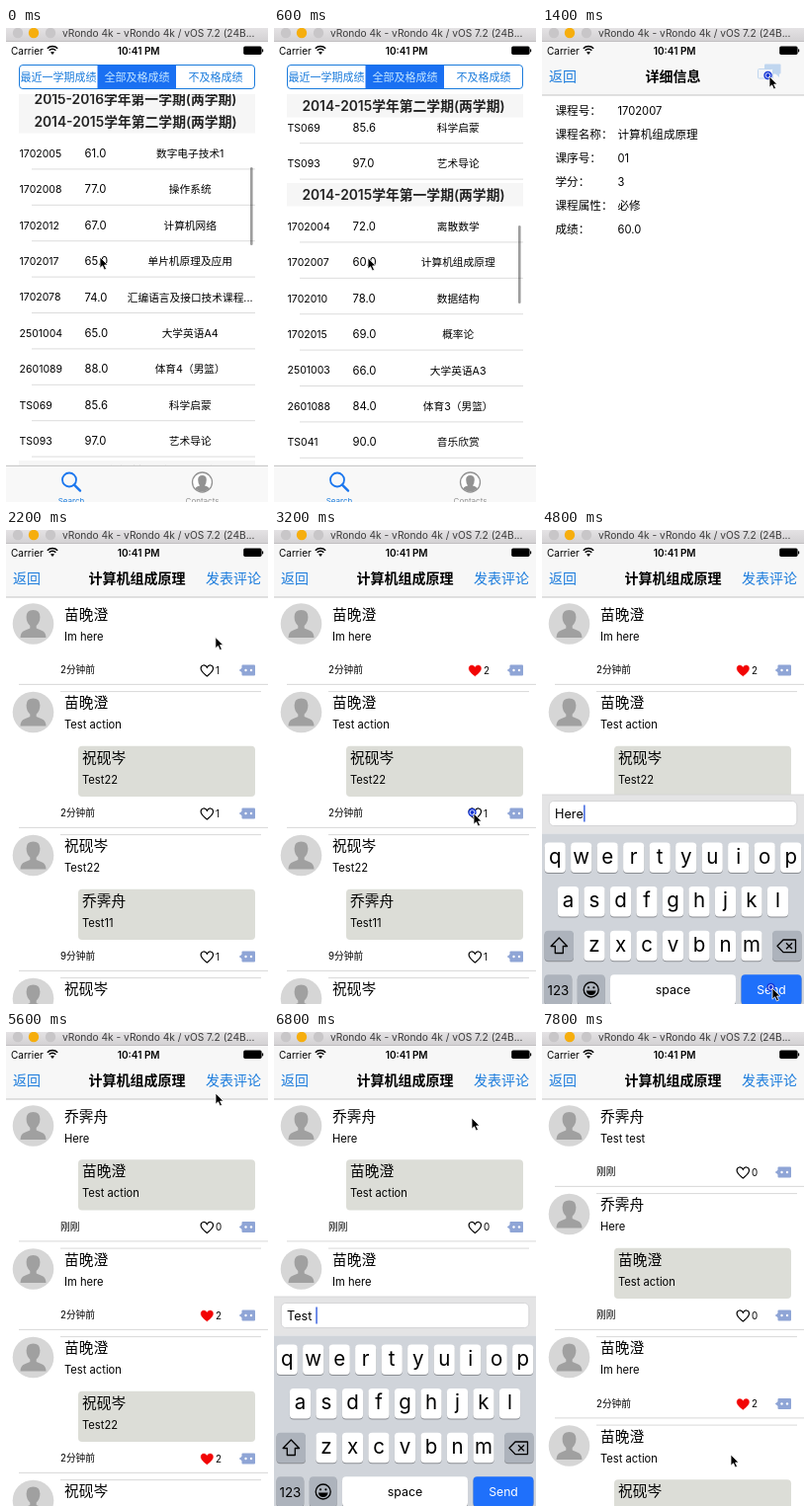
An HTML page for the animation above (8000 ms loop, 265 by 480 pixels).

```html
<!DOCTYPE html>
<html lang="zh-CN">
<head>
<meta charset="utf-8">
<title>Course comments</title>
<style>
  html, body { margin: 0; width: 100%; height: 100%; overflow: hidden; background: #fff; }
  svg { display: block; width: 100%; height: 100%; }
  text { font-family: Inter, "Noto Sans CJK SC", "Noto Sans CJK", sans-serif; }
</style>
</head>
<body>
<svg id="stage" viewBox="0 0 265 480"></svg>
<script>
const LOOP = 8000, STEP = 200, W = 265;
const BLUE = '#1a7bdc', LINE = '#cfcfcf';
const stage = document.getElementById('stage');
const pen = document.createElement('canvas').getContext('2d');

// Easing
const clamp = v => Math.max(0, Math.min(1, v));
const part = (t, a, b) => clamp((t - a) / (b - a));
const easeOut = k => 1 - (1 - k) ** 2;
const smooth = k => k * k * (3 - 2 * k);
const mix = (a, b, k) => a + (b - a) * k;

// Drawing helpers
const rect = (x, y, w, h, fill, r = 0, more = '') =>
  `<rect x="${x}" y="${y}" width="${w}" height="${h}" rx="${r}" fill="${fill}" ${more}/>`;
const circle = (x, y, r, fill, more = '') =>
  `<circle cx="${x}" cy="${y}" r="${r}" fill="${fill}" ${more}/>`;
const path = (d, fill, stroke = 'none', width = 1, more = '') =>
  `<path d="${d}" fill="${fill}" stroke="${stroke}" stroke-width="${width}" ${more}/>`;
const hline = (x1, x2, y, color = LINE) => path(`M${x1} ${y}H${x2}`, 'none', color, .8);
const text = (s, x, y, size, fill = '#000', more = '') =>
  `<text x="${x}" y="${y}" font-size="${size}" fill="${fill}" ${more}>${s}</text>`;
const mid = (s, x, y, size, fill, more = '') => text(s, x, y, size, fill, `text-anchor="middle" ${more}`);
const bold = 'font-weight="600"';
const move = (x, y, body, more = '') => `<g transform="translate(${x} ${y})" ${more}>${body}</g>`;

// Window title and status bar
const defs = `<defs>
  <linearGradient id="bar" x2="0" y2="1"><stop stop-color="#e4e2e4"/><stop offset="1" stop-color="#d3d1d3"/></linearGradient>
  <clipPath id="list"><rect x="0" y="67" width="265" height="376"/></clipPath>
</defs>`;

function chrome() {
  const arc = r => path(`M${47 - r * .72} ${26 - r * .72}A${r} ${r} 0 0 1 ${47 + r * .72} ${26 - r * .72}`, 'none', '#000', 1.5);
  return rect(0, 0, W, 13.5, 'url(#bar)') + hline(0, W, 13.5, '#b9b7b9') +
    circle(12, 5, 5.2, '#c8c6c8') + circle(28, 5, 5.2, '#f6ae0e') + circle(45, 5, 5.2, '#c8c6c8') +
    text('vRondo 4k - vRondo 4k / vOS 7.2 (24B...', 57, 9.3, 10.2, '#3a3a3a') +
    text('Carrier', 5, 26.8, 10) +
    arc(7.2) + arc(4.6) + path('M47 27L45 24.6Q47 23.2 49 24.6Z', '#000') +
    mid('10:41 PM', 134.2, 26.8, 10, '#000', bold) +
    rect(240.2, 18.5, 18.4, 8.4, '#000', 1.6) + rect(259, 21.2, 1.2, 3.2, '#000', .6);
}

// Grade list
const ROW = 36.4, HEAD = 23.5;
const terms = [
  { title: '2015-2016学年第一学期(两学期)', y: -400, rows: [] },
  { title: '2014-2015学年第二学期(两学期)', y: 83, rows: [
    ['1702005', '61.0', '数字电子技术1'], ['1702008', '77.0', '操作系统'],
    ['1702012', '67.0', '计算机网络'], ['1702017', '65.0', '单片机原理及应用'],
    ['1702078', '74.0', '汇编语言及接口技术课程...'], ['2501004', '65.0', '大学英语A4'],
    ['2601089', '88.0', '体育4（男篮）'], ['TS069', '85.6', '科学启蒙'], ['TS093', '97.0', '艺术导论']] },
  { title: '2014-2015学年第一学期(两学期)', y: 438, rows: [
    ['1702004', '72.0', '离散数学'], ['1702007', '60.0', '计算机组成原理'],
    ['1702010', '78.0', '数据结构'], ['1702015', '69.0', '概率论'],
    ['2501003', '66.0', '大学英语A3'], ['2601088', '84.0', '体育3（男篮）'],
    ['TS041', '90.0', '音乐欣赏'], ['TS052', '86.0', '文学导论']] }
];

function segments() {
  const names = ['最近一学期成绩', '全部及格成绩', '不及格成绩'];
  return rect(13.5, 37.5, 238, 24, '#fff', 3.5, `stroke="${BLUE}" stroke-width="1"`) +
    rect(92.5, 37.5, 79.5, 24, '#1a70f2') +
    names.map((s, i) => mid(s, 53 + i * 79.5, 54, 11, i === 1 ? '#c4e6ff' : BLUE)).join('');
}

function tabs() {
  return rect(0, 443, W, 37, '#f8f8f8') + hline(0, W, 443.4, '#b5b5b5') +
    circle(64, 457.5, 7, 'none', 'stroke="#1a76ee" stroke-width="1.8"') +
    path('M69 462.6L75 468.6', 'none', '#1a76ee', 2.4, 'stroke-linecap="round"') +
    circle(198.5, 460, 10, '#fff', 'stroke="#929292" stroke-width="1.3"') +
    path('M191.5 466.5Q192 464.5 196 463.5Q194.2 461 194.2 457.5Q194.2 453 198.5 453T202.8 457.5Q202.8 461 201 463.5Q205 464.5 205.5 466.5Q202.5 469.3 198.5 469.3T191.5 466.5Z', '#929292') +
    mid('Search', 66, 482, 8, BLUE) + mid('Contacts', 198.5, 482, 8, '#929292');
}

function grades(t) {
  const s = 281 * smooth(part(t, 0, 600));
  let out = '';
  for (const term of terms) term.rows.forEach(([id, score, name], i) => {
    const y = term.y + HEAD + i * ROW - s;
    if (y < 20 || y > 443) return;
    if (id === '1702007' && t >= 800) out += rect(13, y, 239, ROW, '#d9d9d9');
    out += text(id, 13.6, y + 24.3, 10.5) + text(score, 79.6, y + 24.5, 11.3) +
      mid(name, 186.2, y + 24.5, 10.7) + hline(26, 252, y + ROW, '#d4d4d4');
  });
  terms.forEach((term, i) => {
    const next = terms[i + 1] ? terms[i + 1].y - s - HEAD : 999;
    const y = Math.min(Math.max(67, term.y - s), next);
    out += rect(13, y, 239, HEAD, '#f6f6f6') + mid(term.title, 131, y + 17.2, 13.8, '#222', bold);
  });
  if (t < 800) out += rect(247, 141 + s * .21, 2.6, 79, '#000', 1.3, 'opacity=".38"');
  return rect(0, 13, W, 467, '#fff') + `<g clip-path="url(#list)">${out}</g>` + segments() + tabs();
}

// Course details
const facts = [['课程号', '1702007'], ['课程名称', '计算机组成原理'], ['课序号', '01'],
  ['学分', '3'], ['课程属性', '必修'], ['成绩', '60.0']];

const details = () => rect(0, 68, W, 412, '#fff') + facts.map(([key, value], i) =>
  text(key + '：', 13.5, 88 + i * 24, 11.6) +
  text(value, 76.5, 88 + i * 24, /\d/.test(value) ? 11.2 : 11.6)).join('');

const navBack = () => rect(0, 13.5, W, 54.5, '#f7f7f7') + hline(0, W, 68, '#b4b4b4');
const back = () => text('返回', 7, 54, 14, BLUE);
const title = s => mid(s, 132.4, 54, 14, '#000', bold);

const bubbles = t => `<g opacity="${t >= 1400 ? .45 : 1}">` +
  rect(225, 36.5, 16.5, 10, '#7fb0e6', 1) + path('M236 46L240 50V46Z', '#7fb0e6') +
  rect(218.5, 41.5, 15, 9.5, '#eef4fb', 1, 'stroke="#7fb0e6" stroke-width="1"') + '</g>';

// Comments
const ANN = '苗晚澄', BEN = '祝砚岑', KAI = '乔霁舟';
const posts = [
  { from: 7600, who: KAI, say: 'Test test', when: '刚刚', likes: 0 },
  { from: 5200, who: KAI, say: 'Here', quote: [ANN, 'Test action'], when: '刚刚', likes: 0 },
  { who: ANN, say: 'Im here', when: '2分钟前', likes: 1, liked: 2800 },
  { who: ANN, say: 'Test action', quote: [BEN, 'Test22'], when: '2分钟前', likes: 1, liked: 3400 },
  { who: BEN, say: 'Test22', quote: [KAI, 'Test11'], when: '9分钟前', likes: 1 },
  { who: BEN, say: 'Test', when: '9分钟前', likes: 0 }
];

const avatar = circle(27.5, 27.5, 20.8, '#d6d6d6') +
  path('M14.5 41.5Q14.5 36 19 34.3L24.3 32V29.5Q20.6 26 20.6 20.5Q20.6 13.5 27.5 13.5T34.4 20.5Q34.4 26 30.7 29.5V32L36 34.3Q40.5 36 40.5 41.5Z', '#a0a0a0');
const heart = on => path('M0 5.6C-3 3-6.2 .8-6.2-2.2C-6.2-6-1.6-6.6 0-3.2C1.6-6.6 6.2-6 6.2-2.2C6.2 .8 3 3 0 5.6Z',
  on ? '#f20505' : '#fff', on ? '#f20505' : '#000', on ? .4 : 1.2);
const replyIcon = rect(-5.5, -5.5, 13.5, 11, '#8fa5d6', 1) + path('M-5-2.5L-8.3 0L-5 2.5Z', '#8fa5d6') +
  circle(-1.5, 0, 1.2, '#fff') + circle(4, 0, 1.2, '#fff');

function card(p, y, t) {
  const h = p.quote ? 145 : 89.5, foot = h - 15, on = t >= p.liked;
  let out = avatar + text(p.who, 59, 23.3, 14.7) + text(p.say, 59, 44, 11.2);
  if (p.quote) out += rect(73, 61.8, 179, 51.2, '#dcddd7', 4) +
    text(p.quote[0], 77, 78.5, 14.7) + text(p.quote[1], 77, 99.5, 11.2);
  out += text(p.when, 55, foot + 3.3, 9.7) + move(203.3, foot + .4, heart(on)) +
    text(p.likes + (on ? 1 : 0), 212, foot + 3.8, 9.8) + move(244, foot, replyIcon) +
    hline(13, W, h - .6) + hline(55, 258, h + 6.6);
  return [move(0, y, out), h];
}

function comments(t) {
  let y = 67.5, out = rect(0, 68, W, 412, '#fff');
  for (const p of posts) {
    if (t < p.from || y > 480) continue;
    const [body, h] = card(p, y, t);
    out += body;
    y += h;
  }
  return out;
}

// Keyboard
const drafts = [[4400, 'He'], [4600, 'Here'], [5200, ''], [6400, 'T'], [6600, 'Tes'],
  [6800, 'Test '], [7000, 'Test te'], [7200, 'Test test'], [7800, '']];
const draftAt = t => drafts.reduce((s, [from, value]) => t >= from ? value : s, '');
const key = (x, y, w, fill = '#fff') => rect(x, y + 1, w, 30.5, '#8a8d92', 4) + rect(x, y, w, 30.5, fill, 4);
const GREY = '#adb3bc';

function keyboard(t) {
  const draft = draftAt(t), caps = !draft;
  let out = rect(0, 268, W, 39.5, '#e4e4e5') + hline(0, W, 268, '#d2d2d2') +
    rect(7.3, 274.5, 250.5, 25, caps ? '#fafafa' : '#fff', 4.5, 'stroke="#cfcfd1" stroke-width=".8"') +
    rect(0, 307.5, W, 173, '#d0d4da');
  if (draft) {
    pen.font = '12.7px Inter, sans-serif';
    out += text(draft, 13, 291.5, 12.7) + rect(13.3 + pen.measureText(draft).width, 278.5, 1.5, 17, '#3f66e0');
  } else {
    out += text(t < 5400 ? '回复 ' + ANN : '评论', 13, 291.8, 13.7, '#bcbcc0');
  }
  ['QWERTYUIOP', 'ASDFGHJKL', 'ZXCVBNM'].forEach((row, r) => {
    const x0 = [13.2, 26.5, 53][r], y = 316.5 + r * 44.6;
    [...row].forEach((c, i) => {
      const x = x0 + i * 26.5;
      out += key(x - 10.6, y, 21.2) + mid(caps ? c : c.toLowerCase(), x, y + (caps ? 22.5 : 21), caps ? 19 : 20.5);
    });
  });
  out += key(2.5, 405.7, 29.5, caps ? '#fff' : GREY) +
    path('M17.3 413L25.5 421.5H21.3V428.5H13.3V421.5H9.1Z', caps ? '#000' : 'none', '#000', 1.3, 'stroke-linejoin="round"') +
    key(233, 405.7, 29.5, GREY) +
    path('M238 421.3L244 415H256.5V427.6H244Z', 'none', '#000', 1.3, 'stroke-linejoin="round"') +
    path('M247 418.3L253 424.3M253 418.3L247 424.3', 'none', '#000', 1.3) +
    key(2.5, 450.3, 27.8, GREY) + mid('123', 16.4, 471.2, 13.3) +
    key(35.8, 450.3, 27.8, GREY) + circle(49.7, 465.5, 7.5, 'none', 'stroke="#000" stroke-width="1.3"') +
    circle(47, 463.3, 1.1, '#000') + circle(52.4, 463.3, 1.1, '#000') +
    path('M44.8 466.5H54.6Q53.8 471 49.7 471T44.8 466.5Z', '#000') +
    key(69, 450.3, 127, '#fff') + mid('space', 132.5, 470, 12.4) +
    key(201.5, 450.3, 61, '#1f70fb') + mid('Send', 232, 470, 12.2, '#fff');
  return out;
}

// Pointer: time, x, y
const trail = [[0, 95, 232], [800, 95, 233], [1400, 230, 49], [1600, 230, 49], [2600, 202, 141],
  [2800, 202, 141], [3200, 202, 287], [3400, 202, 287], [3800, 245, 287], [4000, 249, 289],
  [4400, 249, 289], [4800, 233, 464], [5000, 233, 464], [5600, 212, 62], [5800, 212, 60],
  [6200, 212, 60], [6800, 200, 87], [7000, 200, 87], [7400, 229, 464], [7800, 191, 428]];
const clicks = [800, 1400, 2600, 3200, 3800, 4800, 5800, 7400];

function pointer(t) {
  const i = Math.max(1, trail.findIndex(p => p[0] >= t));
  const [a, b] = [trail[i - 1], trail[i]];
  const k = smooth(part(t, a[0], b[0]));
  const ring = clicks.includes(t)
    ? circle(-1.5, -1, 4.2, '#1637d6') + circle(-1.5, -1, 2.4, 'none', 'stroke="#fff" stroke-width=".8"') : '';
  return move(mix(a[1], b[1], k), mix(a[2], b[2], k),
    ring + path('M0 0V11.2L2.6 8.8L4.5 13L6.5 12.1L4.6 8H8Z', '#000', '#fff', .8));
}

// Pages
function detailPage(t) {
  const k = easeOut(part(t, 1600, 2000));
  let out = move(-W * .3 * k, 0, details());
  if (k > 0) out += move(W * (1 - k), 0, comments(t));
  out += navBack() + back();
  if (k < 1) out += move(-60 * k, 0, title('详细信息') + bubbles(t), `opacity="${1 - k}"`);
  if (k > 0) {
    const dim = t === 5800 ? .35 : 1;
    out += move(100 * (1 - k), 0, title('计算机组成原理') + text('发表评论', 202, 54, 14, BLUE, `opacity="${dim}"`), `opacity="${k}"`);
  }
  return out;
}

function draw(t) {
  const push = easeOut(part(t, 800, 1200));
  let out = defs;
  if (push < 1) out += move(-W * .3 * push, 0, grades(t));
  if (push > 0) out += move(W * (1 - push), 0, detailPage(t));
  const lift = easeOut(part(t, 3600, 4000)) - smooth(part(t, 4800, 5200)) +
    easeOut(part(t, 5800, 6200)) - smooth(part(t, 7400, 7800));
  if (lift > 0) out += move(0, 212 * (1 - lift), keyboard(t));
  stage.innerHTML = out + chrome() + pointer(t);
}

const start = performance.now();
let shown = -1;
function tick() {
  const t = Math.floor((performance.now() - start) % LOOP / STEP) * STEP;
  if (t !== shown) draw(shown = t);
  requestAnimationFrame(tick);
}
tick();
</script>
</body>
</html>
```
